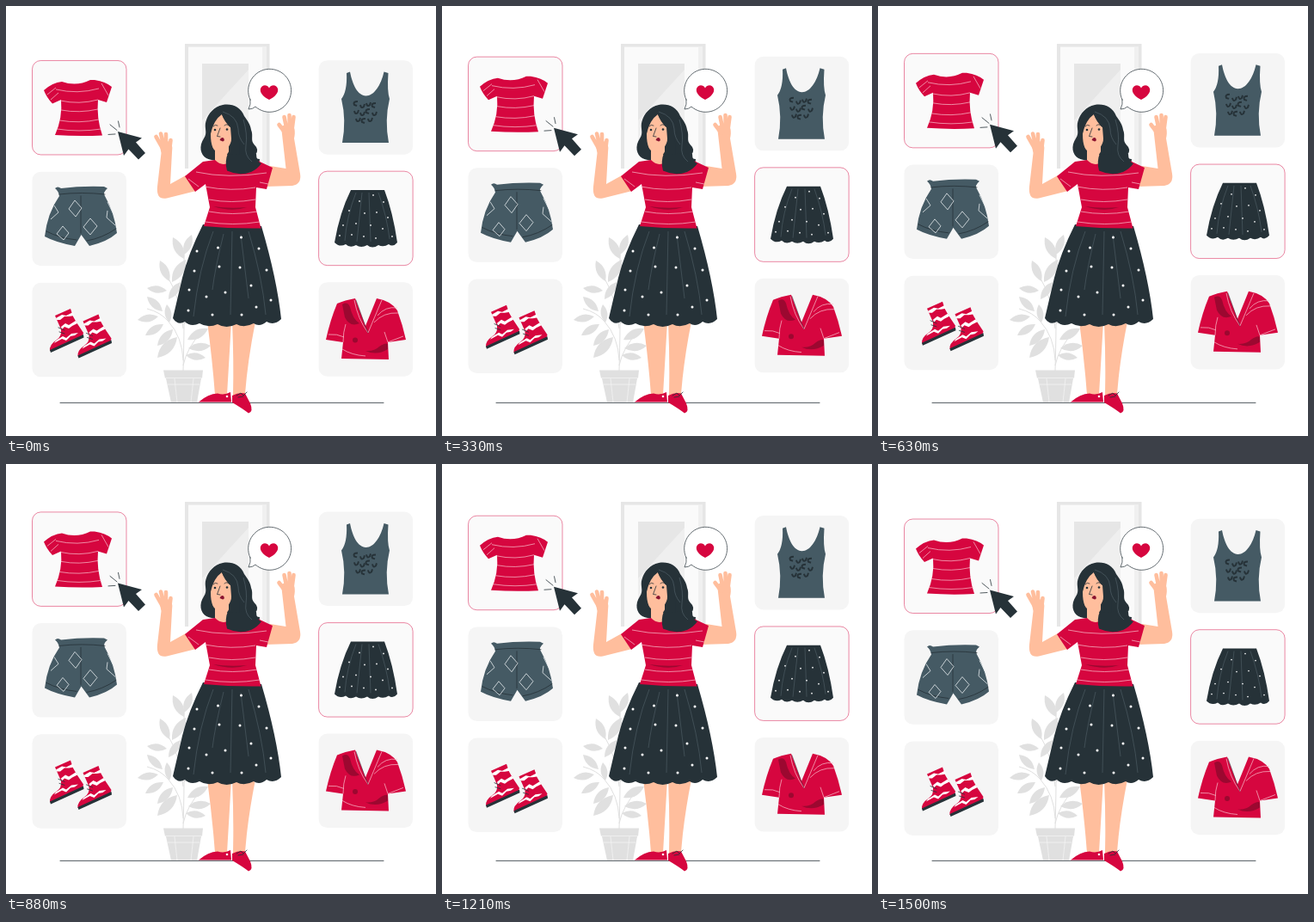
An HTML page for the animation above (1.54 s loop, 500 by 500 pixels).

```html
<!DOCTYPE html>
<html lang="en">
<head>
<meta charset="utf-8">
<title>Choosing clothes</title>
<style>
html, body { margin: 0; width: 100%; height: 100%; overflow: hidden; background: #fff; }
svg { display: block; width: 100%; height: 100%; fill: none; }
.red { fill: #d6063f; }
.wine { fill: #9c0830; }
.dark { fill: #263238; }
.slate { fill: #455a64; }
.skin { fill: #ffbe9d; }
.grey { fill: #e0e0e0; }
.card { fill: #f5f5f5; }
.picked { fill: #fafafa; stroke: #d6063f; stroke-width: .6; stroke-opacity: .8; }
.line { stroke: #263238; stroke-width: .8; stroke-linecap: round; stroke-linejoin: round; }
.fold { stroke: #5a6b73; stroke-width: .5; }
.stripe { stroke: #f9c3cf; stroke-width: .7; }
.pale { stroke: #e8edef; stroke-width: .8; }
.dots { stroke: #fff; stroke-width: 3; stroke-linecap: round; }
.fingers { stroke: #ffbe9d; stroke-width: 4.6; stroke-linecap: round; }
</style>
</head>
<body>
<svg viewBox="0 0 500 500">
  <defs>
    <g id="boot">
      <path class="red" d="M57 360L75 352L78 361L82 368L90 380L89 384L51 401Q50 394 59 388Q65 384 64 376Z"/>
      <path fill="#fff" d="M58 363L65 359L70 360L78 356L79 360L73 361L68 361L63 365L59 365ZM64 373L69 369L73 371L81 366L83 369L77 372L73 375L68 373L65 376ZM58 389L66 384L70 386L76 381L84 380L80 383L75 384L70 389L65 387L56 392Z"/>
      <path class="dark" d="M51 400L90 382L90.500 385.500L52 403Z"/>
      <path class="line" d="M61 374l7 3M62 379l6 2"/>
    </g>
  </defs>

  <!-- room -->
  <path fill="#e6e6e6" d="M208 44H306.500V189H208Z"/>
  <path fill="#fafafa" d="M212 47.500H303V189H212Z"/>
  <path fill="#f0f0f0" d="M298 47.500H303V189H298Z"/>
  <path fill="#e6e6e6" d="M228 67H282V170H228Z"/>
  <path fill="#efefef" d="M282 74V170H228V133Z"/>
  <path class="line" d="M63 461.400H439"/>
  <g id="plant">
    <path stroke="#e0e0e0" d="M206 425Q208 350 207 285M206 412Q205 385 189 367Q180 356 164 352M206 375Q203 340 187 313M206 418Q210 398 228 378M207 345Q210 318 216 300"/>
    <path class="grey" d="M183 423.500H229L228 433H185ZM186 433H227L222 461H192Z"/>
    <path stroke="#f5f5f5" stroke-width=".7" d="M185 432.500H228M188 440H225M196 433L199 461M218 433L215 461"/>
  </g>

  <!-- woman -->
  <path class="dark" d="M252 115C242 117 235 125 232.500 134C230 142 235 147 230 154C224 163 226 173 233 177C241 181 250 179 256 179L257 192Q271 198 285 193L297 184Q294 182 295 178Q290 178 290 173Q295 167 288.500 161C284 156 288 151 285 144C284 137 281 134 277 128C273 117 262 113 252 115Z"/>
  <path class="skin" d="M180.500 171L176 210Q174.500 226 187 223.500L221 215L209 197L191 207L193 170Q195 160 188 157L178 158ZM321 149L325.500 189L307 186L301 210L333 209Q344 207 342 195L335 154Q338 140 330 136L320 140Z"/>
  <path class="fingers" d="M183 167L174.500 152M184 165L180 148.500M186 165L186 149M190 168L191.500 156M325 148L317.500 138M327 146L323.500 129M330 146L329.500 127M332 148L334.500 129"/>
  <path class="skin" d="M234 367Q240 412 243 452L257 452L262 367ZM263 367Q265 412 264 453L278 451Q281 412 290 367Z"/>
  <path class="red" d="M224 460.500Q235 451 246 450.500Q254 453 261 449L262 460.500ZM263 453Q271 449 278 450.500L284 462Q288 472 282 473.500Q275 468 263 461Z"/>
  <path class="line" d="M268 453l5-3l3 3l4-4M270 455l6-1"/>
  <circle cx="257" cy="454" r="1.300" fill="#fff"/>

  <path class="dark" d="M229 254Q212 288 205 316L194 363Q200 372 208 367Q215 374 225 369Q235 375 246 370Q256 376 268 370Q277 375 288 369Q295 374 303 367Q312 372 320 364Q315 317 297 256Z"/>
  <path class="fold" d="M241 262Q224 305 218 361M263 262L261 359M282 262Q298 315 302 359M253 265Q243 305 240 330M273 266L282 340"/>
  <path class="dots" d="M273.500 269h0M246.500 281h0M294 282h0M222 285h0M248 303h0M219 308h0M272 304h0M303 307h0M213 330h0M233 338h0M255 333h0M285 325h0M308 342h0M274 359h0M291 350h0M240 359h0M212 354h0"/>

  <path class="skin" d="M243 163H259V187H243Z"/>
  <path class="red" d="M229 181L243 179Q250 186 257 183L258 191Q272 197 284 193L293 180L310 188L303 213L291 211L290 234L296.500 258.500Q262 259 230 256L237 234L232 207L220 216L208 198Z"/>
  <path class="dark" d="M258 171Q254 181 257 191.500Q271 198 285 193Q293 189 297 183Q291 181 291 172Z"/>
  <path class="stripe" d="M221 193Q258 201 303 194M212 201l12 9M231 210Q262 216 290 211M295 205l10 2M236 225Q262 230 290 225M236 239Q263 244 292 239M232 251Q264 256 295 251"/>
  <path class="wine" d="M241 233Q260 236 280 234Q263 240 241 233Z"/>

  <path class="skin" d="M250 124C242 131 239 139 238 149C238 162 241 170 248 170C256 170 260 163 262 157Q268 147 262 142Q254 134 250 124Z"/>
  <path class="dark" d="M250 120Q240 126 237 140L238 148Q242 132 251 126Q254 135 261 141L262 154Q262 165 257 173L272 172L269 130Z"/>
  <path class="line" d="M241 140Q243 137 246 139M254 139Q257 136 260 140M249 142L245.500 151.500L249 152"/>
  <path stroke="#56666e" stroke-width=".6" d="M252 123Q269 128 270 143Q270 153 277 161M276 132Q281 149 279 162Q277 174 286 181"/>
  <circle class="dark" cx="243" cy="144" r="1.300"/>
  <circle class="dark" cx="257" cy="143.500" r="1.300"/>
  <path fill="#8a1230" d="M248.500 156Q250 152 253 153.500Q255 157 252 157.500Z"/>

  <!-- speech bubble -->
  <path class="line" style="fill:#fff;stroke-width:.7" d="M284 109A25 25 0 1 1 290 117Q287 120 282 120Q285 114 284 109Z"/>
  <path class="red" d="M306 109C300 106 294.500 101 296 96C297.500 91 304 91 306 95.500C308 91 314.500 91 316 96C317.500 101 312 106 306 109Z"/>

  <!-- wardrobe cards -->
  <g id="cards">
    <g id="panels"></g>

    <path class="red" d="M65 88Q82 94 98 86L103 86Q116 88 123 94L117 112L107 109Q105 130 112 150.500Q85 152 57 150Q66 130 64 109L54 113.500Q47 106 44 98Q54 89 65 88Z"/>
    <path class="stripe" d="M58 97Q83 103 108 96M48 103l10-8M52 109l9-8M111 90l8 14M63 110Q85 115 107 109M64 121Q85 125 107 120M62 133Q85 137 108 132M59 143Q85 147 111 143"/>

    <path class="slate" d="M57 212Q60 209 64 212Q88 209 114 210L118 212Q112 217 115 221Q126 240 129 264Q118 274 97 279L87.500 266L80 279Q58 275 45 268Q48 241 62 221Q61 215 57 212Z"/>
    <path class="line" d="M62 219Q88 216 115 219M87 221V264M47 262Q62 270 82 272M94 273Q112 270 128 259"/>
    <path class="pale" d="M80 226l8 9l-7 10l-8-9ZM66 256l7 8l-6 8l-8-7ZM98 247l8 9l-8 10l-8-9ZM56 232l5 8l-9 8M118 228l8 16M118 238l-1 8l10 9"/>

    <use href="#boot"/>
    <use href="#boot" x="32.500" y="6.500"/>

    <path class="slate" d="M396 78L400 76.500C403 92 409 104 418.500 104.500C428 104.500 436 92 439.500 76.500L444.500 78Q443 99 446 108Q440 133 445 159H391Q396 133 390 108Q397 99 396 78Z"/>
    <path id="spots" stroke="#263238" stroke-width="2"/>

    <path class="dark" d="M401 214H440Q450 240 455 275Q450 281 445 277Q439 281 433 278Q426 283 420 278Q413 282 407 278Q400 282 395 277Q388 281 382 275Q388 240 401 214Z"/>
    <path class="fold" d="M407 217Q396 245 394 273M414 217L408 274M422 217L424 274M433 217Q443 245 446 271"/>
    <path class="dots" style="stroke-width:1.700" d="M427 220h0M411 227h0M439 228h0M399 238h0M417 241h0M431 240h0M444 246h0M392 255h0M407 253h0M424 255h0M438 259h0M449 268h0M388 267h0M402 266h0M416 268h0M430 270h0"/>

    <path class="red" d="M385 346Q394 342 406 340L418 372L431 340Q448 343 455 354Q461 370 465 388L444 391L445 411L390 410L392 391L372 388Q377 365 385 346Z"/>
    <path class="wine" d="M391 347Q397 343 400 350Q403 364 411 369Q400 374 394 362ZM418 401Q428 402 434 396Q441 391 444 393L444 399Q431 407 418 401Z"/>
    <circle class="wine" cx="406" cy="388.500" r="3"/>
    <path class="stripe" d="M405 342Q409 364 421 380L437 342M392 391Q392 379 395 370M375 382Q385 381 393 385M432 360Q441 349 455 351M428 368Q439 356 456 357M391 399Q402 406 418 407M440 379L444 391L462 384"/>
    <path class="line" style="stroke-width:.5" d="M407 342L418 373L421 380"/>

    <path class="dark" d="M130 146L158 153.500L151 158.500L162 171L154 178.500L142.500 166.500L137 174Z"/>
    <path class="line" d="M119 149.500L127 149M121 138L129 144.500M130.500 134L132 141"/>
  </g>
</svg>
<script>
const LOOP = 1540, STEPS = 37, LIFT = 10;
const byId = id => document.getElementById(id);

const leaves = [
  [207, 294, 194, 269], [207, 289, 216, 266], [190, 320, 179, 296], [193, 321, 209, 295],
  [187, 331, 164, 328], [189, 341, 203, 321], [182, 355, 164, 338], [177, 361, 153, 365],
  [190, 368, 187, 347], [183, 370, 162, 383], [199, 385, 176, 409], [194, 376, 176, 395],
  [207, 370, 219, 349], [211, 388, 235, 375], [212, 398, 238, 395], [209, 406, 232, 409]
];
byId("plant").innerHTML += leaves.map(([x, y, tx, ty]) => {
  const mx = (x + tx) / 2, my = (y + ty) / 2, dx = (ty - y) * .36, dy = (x - tx) * .36;
  return `<path class="grey" d="M${x} ${y}Q${mx + dx} ${my + dy} ${tx} ${ty}Q${mx - dx} ${my - dy} ${x} ${y}Z"/>`;
}).join("");

const panel = (x, y, picked) =>
  `<rect class="${picked ? "picked" : "card"}" x="${x}" y="${y}" width="109.500" height="109.500" rx="10"/>`;
byId("panels").innerHTML = [0, 1, 2].map(row =>
  panel(30.5, 63.5 + row * 129.2, row === 0) + panel(363.6, 63.2 + row * 129, row === 1)).join("");

let spots = "";
for (let i = 0; i < 11; i++) {
  const x = 407 + i % 4 * 7 + (i > 7 ? 2 : 0), y = 113 + Math.floor(i / 4) * 9 + i % 2 * 2;
  spots += i % 3 ? `M${x - 2} ${y}q1 5 4 2l1-3` : `M${x + 2} ${y - 2}q-6 0-4 4l3 1`;
}
byId("spots").setAttribute("d", spots);

// Linear rise and fall, held at 24 steps per second.
function draw(now) {
  const step = Math.floor((now % LOOP + 4) * STEPS / LOOP);
  const phase = (step + 1) % STEPS / STEPS;
  const rise = LIFT * (1 - Math.abs(2 * phase - 1));
  byId("cards").setAttribute("transform", `translate(0 ${.5 - rise})`);
  requestAnimationFrame(draw);
}
draw(performance.now());
</script>
</body>
</html>
```
